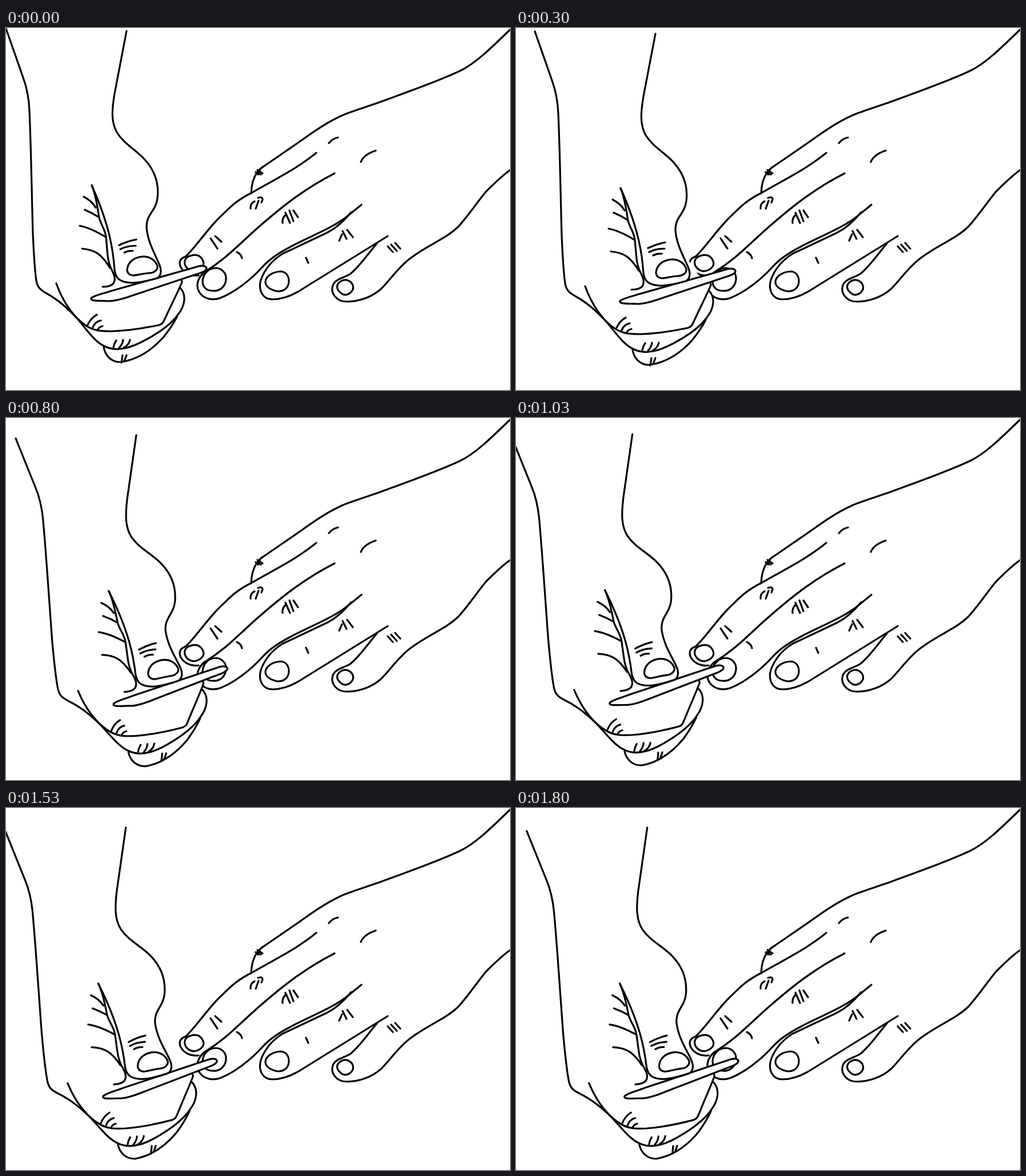
These frames come from a looping animation (882 px wide and 635 px high, 2.03 s). An HTML page:

```html
<!DOCTYPE html>
<html lang="en">
<head>
<meta charset="utf-8">
<title>Filing nails</title>
<style>
html, body { margin: 0; width: 100%; height: 100%; overflow: hidden; background: #fff; }
svg { display: block; width: 882px; height: 635px; }
path { fill: #fff; stroke: #000; stroke-width: 3.2; stroke-linecap: round; stroke-linejoin: round; }
.line { fill: none; }
</style>
</head>
<body>
<svg viewBox="0 0 882 635">
  <g id="restingHand">
    <!-- wrist, thumb and finger outlines -->
    <path class="line" d="M884 1C850 34 822 62 795 75C755 94 700 113 657 129C632 138 605 146 589 153C556 168 530 188 510 202L452 242C440 249 430 262 429 290"/>
    <path class="line" d="M543 219C505 250 460 271 430 289C400 304 390 317 373 333C350 356 330 387 314 401C304 404 302 412 306 420C312 430 324 436 337 434"/>
    <path class="line" d="M575 255C520 283 480 316 440 351C405 382 385 405 346 429C335 440 332 452 338 463C346 476 362 478 374 474C400 464 428 442 448 420C462 404 480 393 505 380C540 362 575 349 600 328L622 310"/>
    <path class="line" d="M604 323C592 338 580 350 562 359C530 374 505 386 484 396C465 408 452 425 446 442C441 460 449 476 466 476C485 476 505 467 520 457L668 365"/>
    <path class="line" d="M649 378C632 398 620 417 603 431C592 438 578 440 573 449C566 464 578 480 596 480C618 480 640 472 656 458C672 442 685 422 705 406C735 382 770 370 792 348C810 328 825 305 840 287C855 272 870 257 884 248"/>
    <!-- nails -->
    <path d="M313 408C316 399 331 396 338 400C345 405 347 412 345 417C341 424 331 428 325 426C317 424 311 416 313 408Z"/>
    <path d="M344 444C345 430 355 421 368 421C378 422 386 430 385 441C384 454 374 462 362 461C351 461 344 455 344 444Z"/>
    <path d="M454 444C456 434 468 428 480 427C490 427 495 435 495 444C495 456 486 462 476 462C464 460 453 454 454 444Z"/>
    <path d="M580 451C583 444 592 440 599 443C606 446 609 453 607 459C603 466 596 470 589 467C583 463 578 457 580 451Z"/>
    <!-- creases -->
    <path class="line" d="M565 202Q571 194 581 192M621 235Q626 222 647 215M437 253L446 257M440 249L449 255M444 250L441 257"/>
    <path class="line" d="M435 304Q427 308 428 317M442 303L437 317M441 298Q449 295 449 301L447 306M358 369L370 387M366 365L377 375M404 393Q412 397 413 404"/>
    <path class="line" d="M489 328Q483 334 484 342M489 324L497 342M496 320L503 339M503 320L511 332M525 403L529 412"/>
    <path class="line" d="M588 362L583 373M589 356L596 370M597 354L607 367M668 383L677 393M674 380L684 391M681 377L690 387"/>
  </g>

  <g id="filingHand">
    <path d="M171 560C174 576 185 586 200 586C230 582 255 565 275 543C287 528 294 517 299 507"/>
    <path d="M0 1L30 87C37 106 40 122 41 145C44 215 45 290 47 360C49 405 51 430 53 443C55 455 60 459 70 465C92 477 108 492 125 510C142 530 155 550 172 558C195 570 222 560 250 544C275 530 290 518 300 504C314 487 316 468 305 456"/>
    <path d="M88 448C100 482 120 510 143 524C155 531 165 532 185 532C215 531 245 526 268 521C275 519 276 514 279 508C288 488 300 465 308 446L307 441"/>
    <path d="M149 474C153 469 170 466 185 461L337 418C346 416 351 418 351 422C350 427 340 430 327 434L222 469C205 475 192 479 180 479C165 478 147 480 149 474Z"/>
    <path d="M211 5L190 115C185 145 184 165 194 183C206 203 228 214 243 231C262 252 268 275 265 299C262 322 245 327 246 350C248 375 260 395 268 414C274 428 270 436 264 439C250 443 235 447 220 447C200 446 192 440 190 425C188 395 183 350 150 276"/>
    <path d="M212 424C213 412 222 403 238 401C252 400 262 408 265 418C266 425 258 430 250 430C238 431 228 434 222 434C215 433 212 429 212 424Z"/>
    <path class="line" d="M150 276C158 295 160 315 163 333C167 347 174 354 175 367C178 395 177 405 183 420C189 432 193 440 188 448C184 453 176 454 169 454"/>
    <path class="line" d="M136 296Q150 303 157 315M138 319Q150 324 161 331M129 347Q147 350 175 367M133 387C155 389 167 396 182 421"/>
    <path class="line" d="M198 381Q212 374 228 371M200 388Q212 382 227 382M207 394Q214 390 222 391"/>
    <path class="line" d="M143 521Q148 509 159 503M152 525Q156 515 166 513M160 530Q163 524 169 523M188 560Q189 554 193 548M198 561Q204 555 205 547M206 561Q215 556 217 547"/>
    <path class="line" id="crease" d="M202 587L204 574M207 584L211 574"/>
  </g>
</svg>
<script>
const LOOP = 2030;
// start time, x, y, angle of the filing hand
const poses = [
  [0, 0, 0, 0],
  [300, 33, 5, 0],
  [570, 7, 14, 0],
  [800, 17, 35, -2.7],
  [1030, -7.3, 33.3, -2.7],
  [1300, 17, 23.3, -2.7],
  [1530, -1.3, 39.3, -2.7],
  [1800, 18.7, 39.3, -2.7]
];
const hand = document.getElementById("filingHand");
const crease = document.getElementById("crease");
const origin = performance.now();

function draw(now) {
  const t = Math.max(0, now - origin) % LOOP;
  const [start, x, y, angle] = poses.filter(p => p[0] <= t).pop();
  hand.setAttribute("transform", `translate(${x} ${y}) rotate(${angle})`);
  // the lowest knuckle crease slides along the finger after the first two strokes
  crease.setAttribute("transform", start < 570 ? "" : "translate(26 -9)");
  requestAnimationFrame(draw);
}
draw(origin);
</script>
</body>
</html>
```
